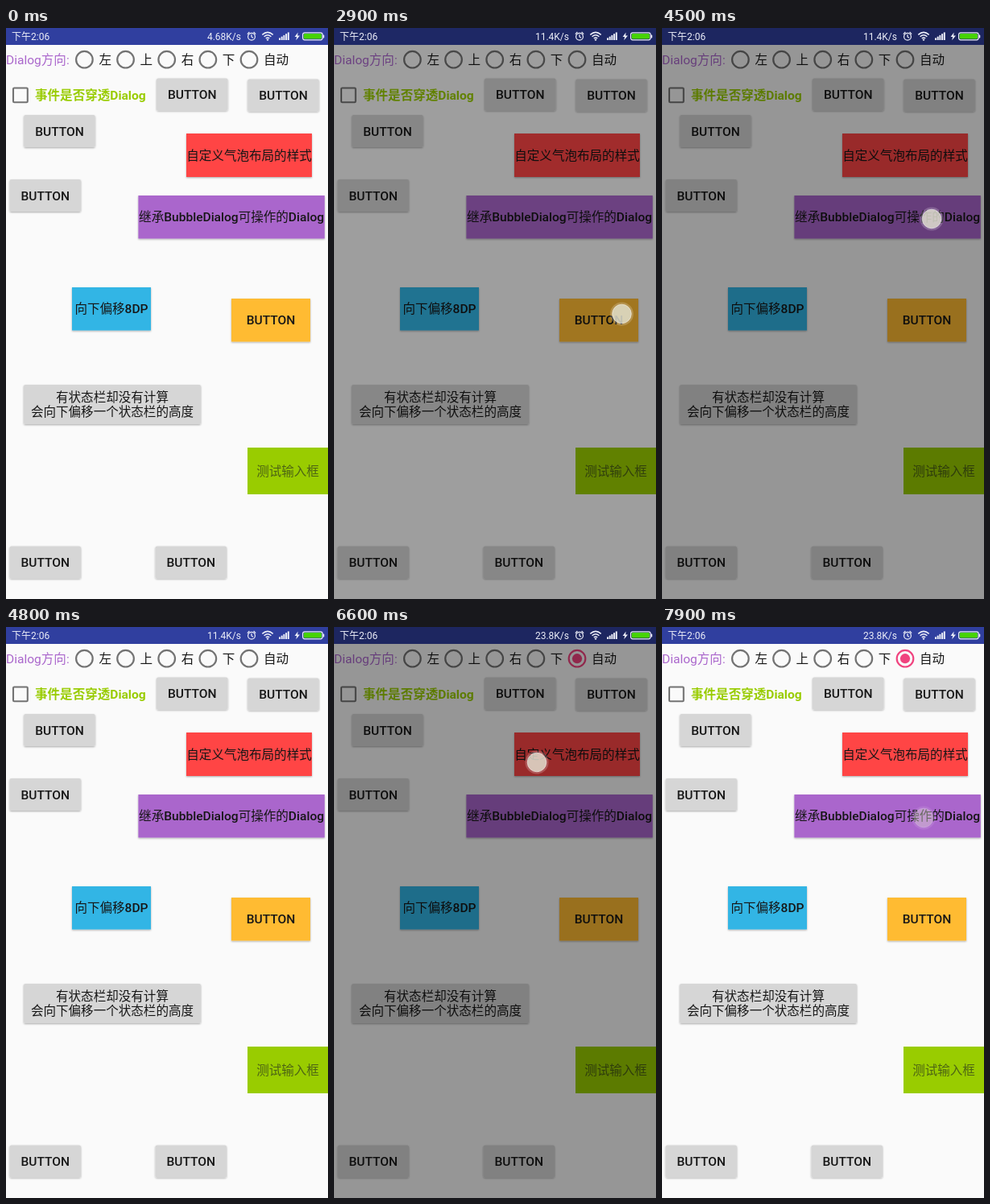
Animation of 400x709 px, one loop 8 s. Source, as an HTML page:

```html
<!DOCTYPE html>
<html lang="zh-CN">
<head>
<meta charset="utf-8">
<style>
html, body { margin: 0; width: 100%; height: 100%; overflow: hidden; background: #fafafa; }
svg { display: block; width: 400px; height: 709px; }
text { font-family: Roboto, "Noto Sans CJK SC", "Noto Sans CJK", sans-serif; font-size: 15.55px; fill: #161616; }
.mid { text-anchor: middle; }
.med { font-weight: 500; }
.bar { font-size: 12px; fill: #eceef8; }
.note { fill: #3a3a50; opacity: .65; }
</style>
</head>
<body>
<svg viewBox="0 0 400 709" xmlns="http://www.w3.org/2000/svg">
  <defs>
    <filter id="shade" x="-10%" y="-20%" width="120%" height="150%">
      <feDropShadow dx="0" dy="1" stdDeviation="1.1" flood-color="#000" flood-opacity=".32"/>
    </filter>
  </defs>
  <rect width="400" height="709" fill="#fafafa"/>
  <rect width="400" height="21" fill="#303f9f"/>
  <text x="0" y="44.8" style="fill:#aa66cc">Dialog方向:</text>
  <g id="radios"></g>
  <rect x="9" y="74.5" width="17.8" height="17.8" rx="1.2" fill="none" stroke="#737373" stroke-width="2.1"/>
  <text x="36" y="89" style="fill:#99cc00;font-weight:700">事件是否穿透Dialog</text>
  <g id="boxes"></g>

  <rect id="dim" width="400" height="709" fill="#000"/>

  <!-- Status icons stay bright above the overlay -->
  <text class="bar" x="7" y="14.8">下午2:06</text>
  <text class="bar" id="speed" x="292" y="14.8" text-anchor="end"></text>
  <g fill="none" stroke="#eceef8" stroke-width="1.2">
    <circle cx="305" cy="10.7" r="4.4"/>
    <path d="M305 8V11L307 12.2M299.8 7.6L302.4 5M310.2 7.6L307.6 5"/>
    <path d="M318.3 8.4Q325 2.4 331.7 8.4M320.6 10.8Q325 6.8 329.4 10.8M322.8 13Q325 11 327.2 13" stroke-width="1.5"/>
    <rect x="368.6" y="5.8" width="24.6" height="9" rx="2.5"/>
  </g>
  <g id="signal" fill="#eceef8">
    <circle cx="325" cy="14.6" r="1.2"/>
    <path d="M362.6 5.5L358.6 11H361.2L360.2 15.3L365 9.4H362.2Z"/>
    <rect x="393.6" y="8.4" width="1.7" height="4" rx=".6"/>
  </g>
  <rect x="369.8" y="7" width="22.2" height="6.6" rx="1.4" fill="#46d305"/>

  <g id="bubble">
    <path fill="#00f" stroke="#ff4a5c" stroke-width="3" paint-order="stroke" d="M254 261Q254 253 262 253H268Q274 253 276.5 247L296.5 203Q302 191 307.5 203L327.5 247Q330 253 336 253H346Q354 253 354 261V352Q354 360 346 360H262Q254 360 254 352Z"/>
    <text class="mid note" x="304" y="304.6">自定义气泡</text>
    <text class="mid note" x="304" y="322.6">布局的样式</text>
  </g>
  <g id="touch">
    <circle r="14.5" fill="#fff" opacity=".22"/>
    <circle r="11.8" fill="#e2e2d2" fill-opacity=".88" stroke="#fff" stroke-opacity=".6"/>
  </g>
</svg>
<script>
const NS = 'http://www.w3.org/2000/svg';
const $ = id => document.getElementById(id);

function add(parent, tag, attrs, text) {
  const el = document.createElementNS(NS, tag);
  for (const k in attrs) el.setAttribute(k, attrs[k]);
  if (text) el.textContent = text;
  return parent.appendChild(el);
}

for (let i = 0; i < 5; i++) {
  const height = 2.6 + i * 1.75;
  add($('signal'), 'rect', { x: 339 + i * 2.7, y: 15 - height, width: 2, height });
}

let ring, dot;
['左', '上', '右', '下', '自动'].forEach((name, i) => {
  const cx = 97.4 + i * 51.15, cy = 39.2;
  ring = add($('radios'), 'circle', { cx, cy, r: 10.3, fill: 'none', stroke: '#737373', 'stroke-width': 2.2 });
  dot = add($('radios'), 'circle', { cx, cy, r: 6.1, fill: '#f0437f' });
  dot.setAttribute('opacity', 0);
  add($('radios'), 'text', { x: cx + 18, y: 44.8 }, name);
});

function box(x, y, width, height, fill, label, rx = 0) {
  const rect = add($('boxes'), 'rect', { x, y, width, height, rx, fill, filter: 'url(#shade)' });
  const lines = label.split('\n');
  const mid = y + height / 2 + 5.6 - (lines.length - 1) * 9;
  const texts = lines.map((s, i) =>
    add($('boxes'), 'text', { x: x + width / 2, y: mid + i * 18, class: 'mid med' }, s));
  return { rect, texts };
}

const GREY = '#d6d6d6';
const button = (x, y) => box(x, y, 88.5, 40, GREY, 'BUTTON', 2);
button(187, 62.5);
button(300.3, 63.5);
button(22.2, 108);
button(4.5, 188);
button(4.5, 643.5);
button(185.5, 643.5);
box(22, 443, 220, 49, GREY, '有状态栏却没有计算\n会向下偏移一个状态栏的高度', 2);
box(224, 131, 156, 54, '#ff4444', '自定义气泡布局的样式');
box(164.4, 208, 231.4, 53.5, '#aa66cc', '继承BubbleDialog可操作的Dialog');
box(82, 322, 98, 53.5, '#33b5e5', '向下偏移8DP');
box(280, 336, 98, 53.5, '#ffbb33', 'BUTTON');
const input = box(300, 521, 100, 58, '#99cc00', '测试输入框');
input.rect.removeAttribute('filter');
input.texts[0].style.cssText = 'fill:#4d6414;font-weight:400';

const LOOP = 8000, STEP = 100;
const TAP_LIFE = 200, FADE_IN = 400, FADE_OUT = 300, DIM = .4;
const dialogs = [
  { open: 2200, close: 2875 },
  { open: 3400, close: 4500 },
  { open: 5860, close: 6600 }
];
const taps = [
  { at: 1500, x: 340, y: 379 },
  { at: 2900, x: 357.5, y: 355 },
  { at: 3400, x: 335, y: 237 },
  { at: 4500, x: 335, y: 237 },
  { at: 5200, x: 302, y: 39 },
  { at: 5800, x: 311, y: 162 },
  { at: 6600, x: 252, y: 168 },
  { at: 7800, x: 325, y: 237 }
];
const clamp = v => Math.max(0, Math.min(1, v));
const shown = (d, t) => clamp((t - d.open) / FADE_IN) - clamp((t - d.close) / FADE_OUT);

function draw(t) {
  $('speed').textContent = t < 2200 ? '4.68K/s' : t < 6100 ? '11.4K/s' : '23.8K/s';

  const auto = t >= 5300;
  ring.setAttribute('stroke', auto ? '#f0437f' : '#737373');
  dot.setAttribute('opacity', auto ? 1 : 0);

  $('dim').setAttribute('opacity', DIM * Math.max(...dialogs.map(d => shown(d, t))));
  const last = dialogs[2];
  $('bubble').setAttribute('opacity', t >= last.open && t < last.close ? 1 : 0);

  const tap = taps.find(p => t >= p.at && t < p.at + TAP_LIFE);
  $('touch').setAttribute('opacity', tap ? .92 * (1 - (t - tap.at) / TAP_LIFE) : 0);
  if (tap) $('touch').setAttribute('transform', `translate(${tap.x} ${tap.y})`);
}

// The screen advances ten times a second
const start = performance.now();
function tick() {
  const t = (performance.now() - start) % LOOP;
  draw(Math.floor(t / STEP) * STEP);
  requestAnimationFrame(tick);
}
tick();
</script>
</body>
</html>
```
